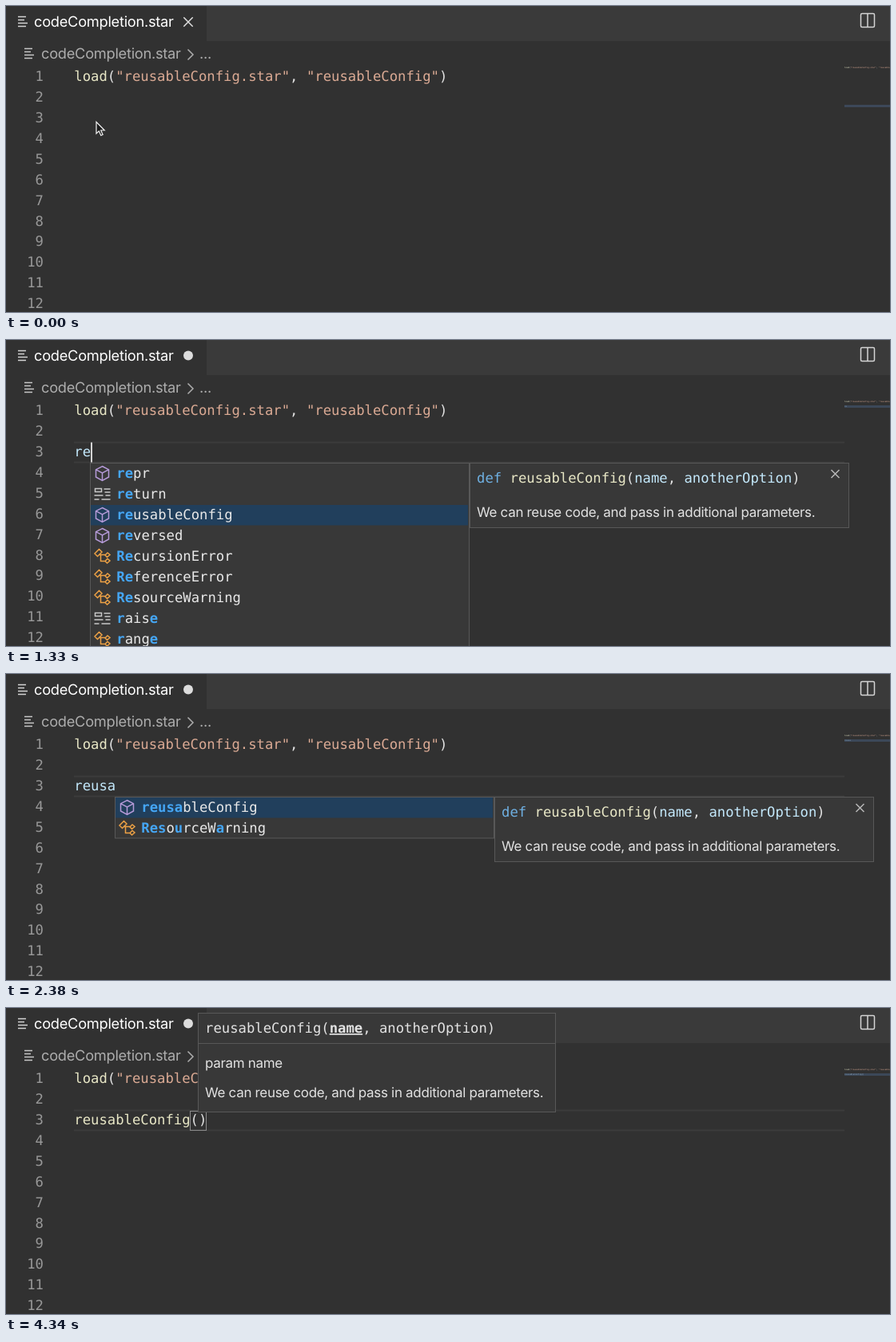
Recreate the animation shown at these times as an HTML page. Size 1106 px wide and 384 px high, loop 4410 ms.

```html
<!DOCTYPE html>
<html lang="en">
<head>
<meta charset="utf-8">
<title>Code completion</title>
<style>
  html, body { margin: 0; width: 100%; height: 100%; overflow: hidden; background: #313131; }
  svg { display: block; width: 1106px; height: 384px; }
  text { white-space: pre; text-rendering: geometricPrecision; }
  .code { font: 17.24px "DejaVu Sans Mono", monospace; }
  .tab { font: 18.25px Inter, sans-serif; letter-spacing: -0.015em; }
  .doc { font: 16.98px Inter, sans-serif; letter-spacing: -0.018em; fill: #e2e2e2; }
  .mini { font: 2.55px "DejaVu Sans Mono", monospace; }
  .hit { font-weight: bold; fill: #45a6f5; }
  .line { fill: none; stroke-width: 1.5; }
</style>
</head>
<body>
<svg id="stage" viewBox="0 0 1106 384"></svg>
<script>
const LOOP = 4410, LEFT = 85.3, CHAR = 10.38, ROW = 25.91, BLINK = 500;
const C = {
  bg: '#313131', bar: '#3a3a3a', panel: '#383838', edge: '#585858', pick: '#213f5c',
  text: '#e2e2e2', dim: '#989898', crumb: '#adadad', fn: '#e8e7c6', str: '#dbaa94',
  name: '#c3e8fb', key: '#6fb0e2', cube: '#b59ad8', tree: '#eda145'
};

// Row kinds: k keyword, t type, f function; brackets mark matched letters.
const LISTS = {
  r: { pick: 4, rows: ['k [r]aise', 't [r]ange', 'f [r]epr', 'k [r]eturn', 'f [r]eusableConfig',
    'f [r]eversed', 'f [r]ound', 't [R]ecursionError', 't [R]eferenceError'] },
  re: { pick: 2, rows: ['f [re]pr', 'k [re]turn', 'f [re]usableConfig', 'f [re]versed',
    't [Re]cursionError', 't [Re]ferenceError', 't [Re]sourceWarning', 'k [r]ais[e]', 't [r]ang[e]'] },
  reu: { pick: 0, rows: ['f [reu]sableConfig', 'k [re]t[u]rn', 't [Re]so[u]rceWarning'] },
  reus: { pick: 0, rows: ['f [reus]ableConfig', 't [Res]o[u]rceWarning'] },
  reusa: { pick: 0, rows: ['f [reusa]bleConfig', 't [Res]o[u]rceW[a]rning'] }
};

// Each step changes part of the editor state; `press` restarts the caret blink.
const STEPS = [
  { at: 0, typed: '', focus: false, pointer: true, dirty: false, list: false, detail: false, call: false, hint: false },
  { at: 70, focus: true, press: true },
  { at: 140, pointer: false, dirty: true },
  { at: 560, typed: 'r', press: true },
  { at: 630, list: true, detail: true },
  { at: 1190, typed: 're', press: true },
  { at: 1400, typed: 'reu', press: true },
  { at: 1470, typed: 'reus', press: true },
  { at: 1540, typed: 'reusa', press: true },
  { at: 3010, typed: 'reusableConfig', list: false, detail: false, press: true },
  { at: 3500, call: true, press: true },
  { at: 3570, hint: true }
];

const rect = (x, y, w, h, fill, extra = '') =>
  `<rect x="${x}" y="${y}" width="${w}" height="${h}" fill="${fill}" ${extra}/>`;
const panel = (x, y, w, h) => rect(x + .5, y + .5, w, h, C.panel, `stroke="${C.edge}"`);
const path = (d, color, extra = '') => `<path class="line" d="${d}" stroke="${color}" ${extra}/>`;
const at = (x, y, body) => `<g transform="translate(${x} ${y})">${body}</g>`;
const text = (cls, x, y, body, fill = '', extra = '') =>
  `<text class="${cls}" x="${x}" y="${y}" ${fill && `fill="${fill}"`} ${extra}>${body}</text>`;
const span = (body, fill) => `<tspan fill="${fill}">${body}</tspan>`;
const base = n => Math.round(94.2 + ROW * (n - 1));

const cross = (x, y, r, color) => at(x, y, path(`M${-r} ${-r}L${r} ${r}M${r} ${-r}L${-r} ${r}`, color));
const fileIcon = (x, y, color) => at(x, y, path('M0 -6h10M0 -2h8M0 2h12M0 6h10', color));

const ICONS = {
  k: path('M-9 -7h8v4h-8zM2 -6.5h8M3 -2.5h7M-10 1.5h11M4 1.5h6M-10 6.5h6M-1 6.5h11', '#c8c8c8'),
  t: path('M-4 -9L-9.5 -3.5L-6 0L-.5 -5.5zM-4 -2H4M-2 -2V6H4M6.5 -4.5L3.5 -1.5L6 1L9.5 -2zM6.5 3L3.5 6L6 8.5L9.5 5.5z', C.tree),
  f: path('M0 -9L8 -4.8V4.5L0 9L-8 4.5V-4.8zM-8 -4.8L0 -.5L8 -4.8M0 -.5V9', C.cube)
};

const LOAD = span('load', C.fn) + span('(', C.text) + span('"reusableConfig.star"', C.str) +
  span(', ', C.text) + span('"reusableConfig"', C.str) + span(')', C.text);

function frame(dirty) {
  let out = rect(0, 0, 1106, 384, C.bg) + rect(251, 0, 855, 44, C.bar);
  out += fileIcon(15, 19.5, '#d4d4d4') + text('tab', 35, 26, 'codeCompletion.star', '#fff');
  out += dirty ? '<circle cx="228" cy="19.5" r="6" fill="#dcdcdc"/>' : cross(228, 20, 5.7, '#e0e0e0');
  out += rect(1069.5, 9.5, 17, 17, 'none', 'rx="1.5" stroke="#d4d4d4" stroke-width="1.5"') +
    path('M1078 9.5v17', '#d4d4d4');
  out += fileIcon(23, 59.5, '#c8c8c8') + text('tab', 44, 66, 'codeCompletion.star', C.crumb) +
    path('M227.5 54.5L234 61L227.5 67.5', C.crumb) + text('tab', 242, 66, '...', C.crumb);
  for (let n = 1; n <= 12; n++) out += text('code', 47, base(n), n, C.dim, 'text-anchor="end"');
  return out + text('code', LEFT, base(1), LOAD);
}

function minimap(s) {
  const label = s.typed + (s.call ? '()' : '');
  return rect(1049, s.focus ? 82 : 124, 57, 3, '#3c4859') +
    text('mini', 1049, 78.3, LOAD) + text('mini', 1049, 84.3, label, '#8fa9bd');
}

function inputLine(s, caret) {
  if (!s.focus) return '';
  const end = LEFT + CHAR * s.typed.length;
  let out = rect(85, 127.5, 964, 2, '#3c3c3c') + rect(85, 152.5, 964, 2, '#3c3c3c');
  if (s.call) out += rect(Math.round(end) - .5, 129.5, 20, 24, 'none', 'stroke="#8c8c8c"');
  out += text('code', LEFT, base(3), span(s.typed, s.call ? C.fn : C.name) + (s.call ? span('()', C.text) : ''));
  if (caret) out += rect(Math.floor(end + (s.call ? CHAR : 0)), 128.5, 2, 25, '#d4d4d4');
  return out;
}

function suggestions(s) {
  if (!s.list) return '';
  const { rows, pick } = LISTS[s.typed], x = Math.round(84.2 + CHAR * s.typed.length);
  let out = panel(x, 154, 474, rows.length * 26 - .5);
  rows.forEach((row, i) => {
    const y = 154 + i * 26;
    if (i === pick) out += rect(x + 1, y + 1, 472, 25.5, C.pick);
    const label = row.slice(2).replace(/\[(\w+)\]/g, '<tspan class="hit">$1</tspan>');
    out += at(x + 15.5, y + 13.5, ICONS[row[0]]) + text('code', x + 33.3, y + 19, label, '#e8e8e8');
  });
  return out + (s.detail ? detail(x + 475) : '');
}

function detail(x) {
  const sign = span('def ', C.key) + span('reusableConfig', C.fn) + span('(', C.text) +
    span('name', C.name) + span(', ', C.text) + span('anotherOption', C.name) + span(')', C.text);
  return panel(x, 154, 474, 81) + text('code', x + 9, 179, sign) + cross(x + 457.5, 168, 5, '#b8b8b8') +
    text('doc', x + 9, 222, 'We can reuse code, and pass in additional parameters.');
}

function hint(s) {
  if (!s.hint) return '';
  const sign = 'reusableConfig(<tspan font-weight="bold" text-decoration="underline">name</tspan>, anotherOption)';
  return panel(240, 6, 447, 124) + rect(241, 44, 446, 1, C.edge) +
    text('code', 249, 31, sign, C.text) + text('doc', 249, 75, 'param name') +
    text('doc', 249, 112, 'We can reuse code, and pass in additional parameters.');
}

const pointer = s => s.pointer
  ? at(113, 145.5, '<path d="M0 0V14.5L3.3 11.4L5.8 17L8.1 16L5.7 10.5H10.2Z" fill="#1c1c1c" stroke="#f2f2f2" stroke-width="1.2"/>')
  : '';

const stage = document.getElementById('stage');
let shown = '';

function draw(t) {
  const past = STEPS.filter(step => step.at <= t);
  const s = Object.assign({}, ...past);
  const pressed = past.filter(step => step.press).pop();
  const caret = !!pressed && Math.floor((t - pressed.at) / BLINK) % 2 === 0;
  const key = past.length + '/' + caret;
  if (key === shown) return;
  shown = key;
  stage.innerHTML = frame(s.dirty) + minimap(s) + inputLine(s, caret) + suggestions(s) + hint(s) + pointer(s);
}

const start = performance.now();
function tick() {
  draw((performance.now() - start) % LOOP);
  requestAnimationFrame(tick);
}
tick();
</script>
</body>
</html>
```
